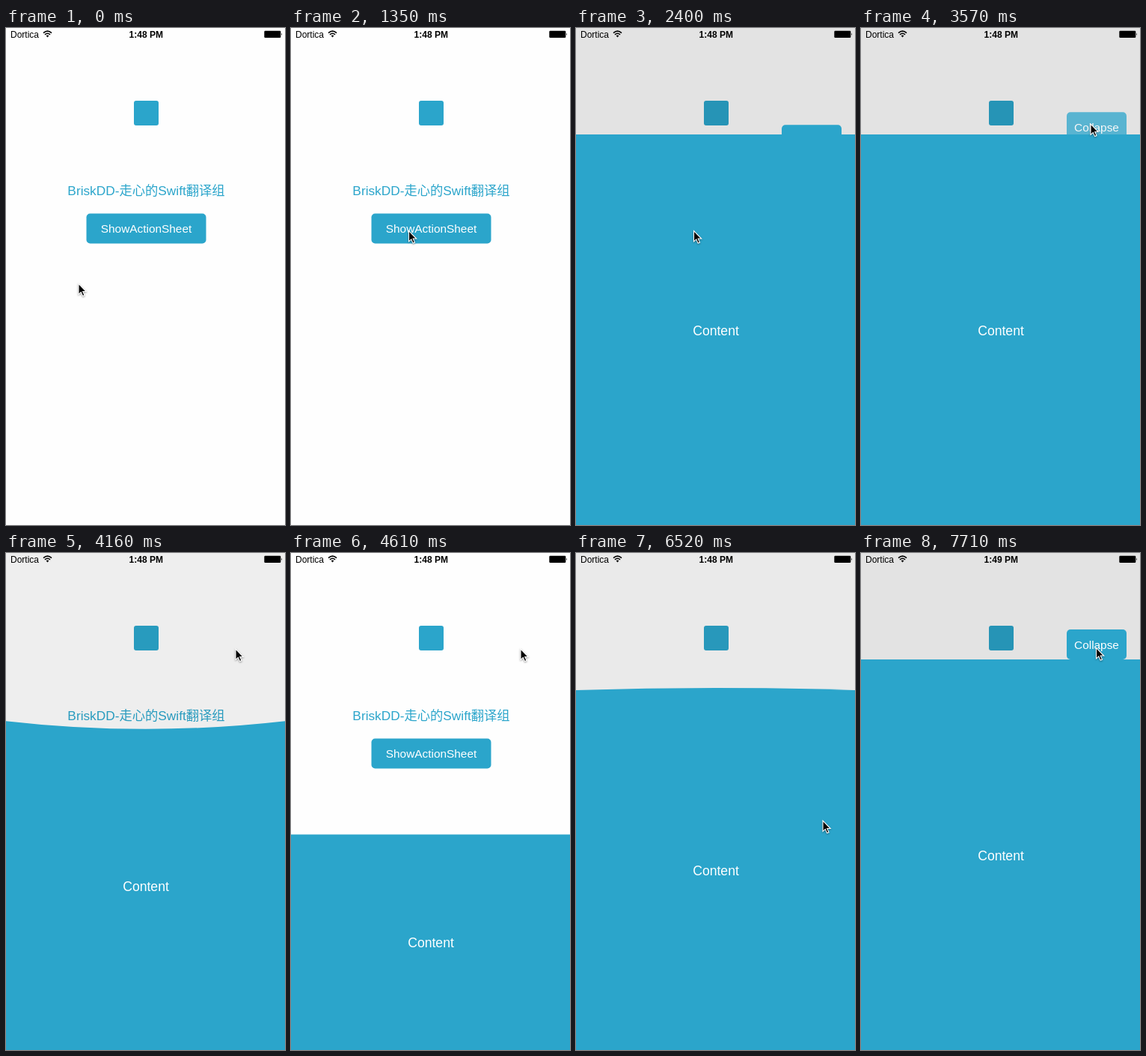
An HTML page for the animation above (8000 ms loop, 373 by 663 pixels).

```html
<!DOCTYPE html>
<html lang="zh">
<head>
<meta charset="utf-8">
<style>
  html, body { margin: 0; width: 100%; height: 100%; overflow: hidden; background: #fefefe; }
  svg { display: block; width: 373px; height: 663px; }
  text { font-family: "Liberation Sans", "Noto Sans CJK SC", "Noto Sans CJK", sans-serif; text-anchor: middle; }
  .blue { fill: #2ba5cb; }
  .label { font-size: 15.4px; fill: #fff; }
</style>
</head>
<body>
<svg viewBox="0 0 373 663">
  <rect width="373" height="663" fill="#fefefe"/>
  <rect class="blue" x="171" y="97" width="33" height="33" rx="3"/>
  <text class="blue" x="187.5" y="223" font-size="17.3" font-weight="300">BriskDD-走心的Swift翻译组</text>
  <rect class="blue" x="107.5" y="247.5" width="160" height="40" rx="5"/>
  <text class="label" id="show" x="187.5" y="273">ShowActionSheet</text>
  <rect id="shade" width="373" height="663"/>

  <text x="6" y="12.5" font-size="12" style="text-anchor:start">Dortica</text>
  <path d="M50 6.6Q55.5 1.6 61 6.6M52 8.9Q55.5 5.6 59 8.9" fill="none" stroke="#000" stroke-width="1.6"/>
  <path d="M53.6 10.3Q55.5 8.8 57.4 10.3L55.5 12.4Z"/>
  <text id="clock" x="187.3" y="12.5" font-size="12" font-weight="bold"></text>
  <rect x="345.3" y="3.8" width="22" height="9.2" rx="1.2"/>
  <path d="M368.2 6.8q1.6 1.6 0 3.2z"/>

  <g id="toggle">
    <rect class="blue" x="275" width="80" height="40" rx="5"/>
    <text class="label" id="action" x="315" y="25.5"></text>
  </g>
  <g id="panel">
    <path class="blue" id="sheet"/>
    <text id="content" x="187" font-size="17.6" fill="#fff">Content</text>
  </g>
  <path id="cursor" d="M0 0V14.3L3.3 11.3 5.6 16.6 8 15.6 5.7 10.5H10.2Z" stroke="#fff" stroke-width="1.1"
        style="filter:drop-shadow(0 1px 1px #0006)"/>
</svg>
<script>
const $ = id => document.getElementById(id);
const TICK = 148, LOOP = 8000;   // the picture advances once per tick; times below are in ticks
const OPEN = 142, HALF = 375.5, HIDDEN = 663;
const SLIDE = 3, TAP_LEAD = 3.4, RISE_DELAY = 5.3;

const slides = [
  { start: 10.1, from: HIDDEN, to: OPEN },
  { start: 26.8, from: OPEN, to: HALF },
  { start: 41.8, from: HALF, to: OPEN },
];
const stops = [
  { start: 1, x: 157.5, y: 270.5 },
  { start: 18, x: 307, y: 128 },
  { start: 35, x: 330, y: 357 },
  { start: 47, x: 314.5, y: 126.5 },
];

const clamp = x => Math.min(1, Math.max(0, x));
const ease = x => (x = clamp(x), x * x * (3 - 2 * x));
const mix = (a, b, p) => a + (b - a) * p;

function set(id, attrs) {
  for (const name in attrs) $(id).setAttribute(name, attrs[name]);
}

function drawSheet(n) {
  const tapped = slides.filter(s => n >= s.start - TAP_LEAD);
  const { start, from, to } = tapped[tapped.length - 1] || slides[0];
  const x = (n - start) / SLIDE;
  const y = mix(from, to, ease(x));

  // The middle of the edge runs ahead of its ends, then they catch up.
  const u = clamp((x + .35) / 1.35);
  const bulge = 97 * u * (1 - u) ** 2 * Math.sign(from - to);
  set('sheet', { d: `M0 ${y}Q186.5 ${y - 2 * bulge} 373 ${y}V663H0Z` });
  set('content', { y: (y + 663) / 2 + 7 });
  set('panel', { opacity: u > 0 || from < HIDDEN ? 1 : 0 });
  set('shade', { opacity: .105 * (to === OPEN ? clamp(x) : 1 - clamp(x)) });

  const fall = ease((n - start + TAP_LEAD) / 1.8);
  const rise = ease((n - start - RISE_DELAY) / 1.6);
  const falling = from < HIDDEN && fall < 1;
  const lift = 40 * (falling ? 1 - fall : rise);
  set('toggle', { transform: `translate(0 ${y - lift})`, opacity: lift ? falling ? .75 : 1 : 0 });
  $('action').textContent = (n < start ? from : to) === OPEN ? 'Collapse' : 'Expand';
}

function drawCursor(n) {
  let x = 97, y = 341;
  for (const s of stops) {
    const p = ease((n - s.start) / 4.5);
    x = mix(x, s.x, p);
    y = mix(y, s.y, p);
  }
  set('cursor', { transform: `translate(${x} ${y})` });
}

function draw() {
  const n = Math.floor((performance.now() - begin) % LOOP / TICK);
  set('show', { opacity: n === 8 ? .5 : 1 });
  $('clock').textContent = n < 48 ? '1:48 PM' : '1:49 PM';
  drawSheet(n);
  drawCursor(n);
  requestAnimationFrame(draw);
}
const begin = performance.now();
draw();
</script>
</body>
</html>
```
